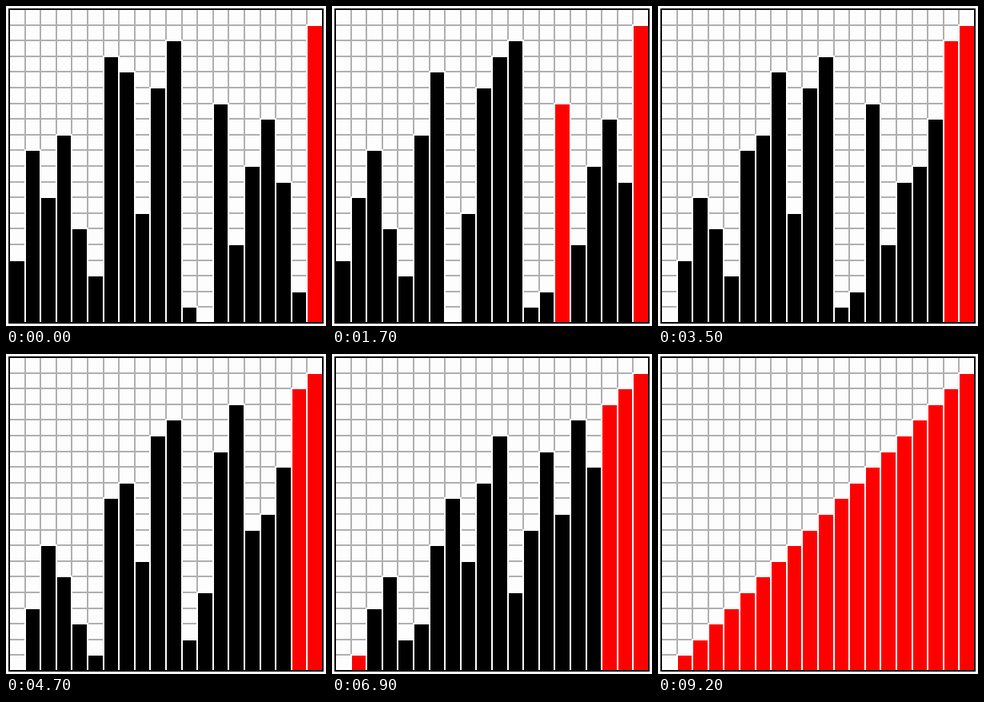
Write a matplotlib script that moves like this. It is 400 px wide and 400 px high and loops after 9.3 s.

```python
import matplotlib.pyplot as plt
from matplotlib.animation import FuncAnimation
from matplotlib.patches import Rectangle

SIZE, LEFT, BASE, PITCH = 400, 4, 396, 19.6
START = [4, 11, 8, 12, 6, 3, 17, 16, 7, 15, 18, 1, 0, 14, 5, 10, 13, 9, 2, 19]
COUNT = len(START)


def two_way_bubble(values):
    """Return the list after every swap; one scan runs down while another runs up."""
    a = list(values)
    states = [a[:]]
    while a != sorted(a):
        for i in range(COUNT - 1):
            for k in (COUNT - 2 - i, i):
                if a[k] > a[k + 1]:
                    a[k], a[k + 1] = a[k + 1], a[k]
                    states.append(a[:])
    return states


def edge_x(k):
    return round(LEFT + PITCH * k)


def edge_y(value):
    return round(BASE - PITCH * value)


states = two_way_bubble(START)
states.insert(0, states[0])  # the unsorted row is held for two ticks

# At 72 dpi one point is one pixel.
fig = plt.figure(figsize=(SIZE / 72, SIZE / 72), dpi=72, facecolor="white")
ax = fig.add_axes([0, 0, 1, 1])
ax.set(xlim=(0, SIZE), ylim=(SIZE, 0))
ax.axis("off")

span = BASE - LEFT
ax.add_patch(Rectangle((LEFT, LEFT), span, span, fc="#fdfdfd", ec="none", zorder=0))
for k in range(1, COUNT):
    x, y = edge_x(k), edge_y(k)
    ax.plot([x, x], [LEFT, BASE], color="#b0b0b0", lw=2, zorder=1)
    ax.plot([LEFT, BASE], [y, y], color="#b0b0b0", lw=2, zorder=1)

bars = [
    ax.add_patch(Rectangle((edge_x(k), BASE), edge_x(k + 1) - edge_x(k), 0,
                           ec="white", lw=2, zorder=2))
    for k in range(COUNT)
]
ax.add_patch(Rectangle((LEFT, LEFT), span, span, fc="none", ec="black", lw=2, zorder=3))


def draw(frame):
    for k, (bar, value) in enumerate(zip(bars, states[frame])):
        top = edge_y(value)
        bar.set_y(top)
        bar.set_height(BASE - top)
        bar.set_facecolor("red" if value == k else "black")
        bar.set_visible(value > 0)
    return bars


anim = FuncAnimation(fig, draw, frames=len(states), interval=100,
                     repeat=True, repeat_delay=0, blit=False)
plt.show()
```
